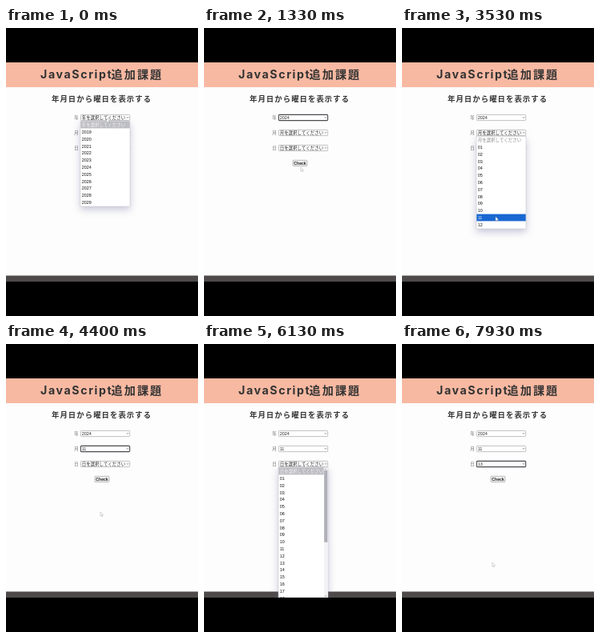
An HTML page with a canvas that plays this animation: 240 by 360 pixels, repeating every 8 s.

```html
<!DOCTYPE html>
<html lang="ja">
<head>
<meta charset="utf-8">
<style>
  html, body { margin: 0; width: 100%; height: 100%; overflow: hidden; background: #000; }
  canvas { display: block; width: 240px; height: 360px; }
</style>
</head>
<body>
<canvas id="stage"></canvas>
<script>
const LOOP = 8000, ROW = 8.79;
const SANS = '"Liberation Sans", "Noto Sans CJK JP", sans-serif';
const HEAD = 'Inter, "Noto Sans CJK JP", sans-serif';
const canvas = document.getElementById('stage');
const ratio = window.devicePixelRatio || 1;
canvas.width = 240 * ratio;
canvas.height = 360 * ratio;
const ctx = canvas.getContext('2d');
ctx.scale(ratio, ratio);

const twoDigits = n => String(n).padStart(2, '0');
const range = (first, count, format) => Array.from({ length: count }, (_, i) => format(first + i));

// top: upper edge of the select; open / pick: times in ms
const selects = [
  { label: '年', top: 108, open: 0, pick: 1150, value: '2024', bottom: 223, items: range(2019, 11, String) },
  { label: '月', top: 127, open: 2540, pick: 3950, value: '11', bottom: 251, items: range(1, 12, twoDigits) },
  { label: '日', top: 146, open: 5800, pick: 7650, value: '13', bottom: 317, items: range(1, 31, twoDigits), scroll: true }
];

// pointer stops: time, x, y
const path = [
  [0, 126, 113], [200, 126, 113], [800, 119, 173], [1150, 120, 174], [1400, 121, 174],
  [2100, 127, 131], [2750, 127, 132], [3500, 117, 236], [3950, 118, 237], [4400, 118, 210],
  [5100, 126, 150], [6250, 126, 150], [7000, 111, 274], [7650, 111, 274], [8000, 113, 273]
];

function pointerAt(t) {
  const i = path.findIndex(stop => stop[0] > t);
  const [t0, x0, y0] = path[i - 1], [t1, x1, y1] = path[i];
  const u = (t - t0) / (t1 - t0), e = u * u * (3 - 2 * u);
  return { x: x0 + (x1 - x0) * e, y: y0 + (y1 - y0) * e };
}

function rect(x, y, w, h, color) {
  ctx.fillStyle = color;
  ctx.fillRect(x, y, w, h);
}

function box(x, y, w, h, fill, stroke, line, radius = 1) {
  ctx.beginPath();
  ctx.roundRect(x, y, w, h, radius);
  ctx.fillStyle = fill;
  ctx.fill();
  ctx.strokeStyle = stroke;
  ctx.lineWidth = line;
  ctx.stroke();
}

function text(string, x, middle, size, color, { family = SANS, weight = 400, spacing = 0, align = 'left' } = {}) {
  ctx.font = `${weight} ${size}px ${family}`;
  ctx.letterSpacing = spacing + 'px';
  ctx.textAlign = align;
  ctx.fillStyle = color;
  ctx.fillText(string, x, middle + size * 0.37);
}

function polyline(points, color, width) {
  ctx.beginPath();
  points.forEach(([x, y]) => ctx.lineTo(x, y));
  ctx.strokeStyle = color;
  ctx.lineWidth = width;
  ctx.stroke();
}

function drawPage() {
  rect(0, 0, 240, 360, '#000');
  rect(0, 43, 240, 274, '#fdfdfd');
  rect(0, 43, 240, 31, '#f8b9a2');
  rect(0, 309.5, 240, 7.5, '#4e4a49');
  text('JavaScript', 43, 58, 14.2, '#333', { family: HEAD, weight: 700, spacing: 1.6 });
  text('追加課題', 131.5, 57.9, 14.2, '#333', { family: HEAD, weight: 700, spacing: 2 });
  text('年月日から曜日を表示する', 57, 88.5, 9.4, '#333', { family: HEAD, weight: 700, spacing: 1.05 });
  box(111, 165.3, 18, 7.2, '#efefef', '#999', 0.6);
  text('Check', 120, 168.7, 5.1, '#222', { weight: 700, align: 'center' });
}

function drawSelect(select, t, focused) {
  const { label, top, value } = select;
  const picked = t >= select.pick, middle = top + 3.8;
  text(label, 85.3, middle, 5.4, '#666');
  box(93.4, top + 0.4, 61.3, 7.2, '#fff', focused ? '#4a4a50' : '#999', focused ? 1.1 : 0.6);
  text(picked ? value : `${label}を選択してください`, 94.7, middle, 5.45, '#222');
  polyline([[150.8, middle - 0.6], [152, middle + 0.6], [153.2, middle - 0.6]], '#444', 0.6);
}

function drawList({ label, top, bottom, items, scroll }, pointer) {
  const start = top + 8.3, first = start + ROW + 0.6;
  const right = scroll ? 150 : 155;
  const hovered = Math.floor((pointer.y - first) / ROW);

  ctx.save();
  ctx.beginPath();
  ctx.rect(0, 43, 240, 274);
  ctx.clip();
  ctx.shadowColor = 'rgba(95, 95, 150, .34)';
  ctx.shadowBlur = 9 * ratio;
  ctx.shadowOffsetY = 4 * ratio;
  rect(93, start, 62, bottom - start, '#fff');
  ctx.shadowColor = 'transparent';
  ctx.strokeStyle = '#c4c4c8';
  ctx.lineWidth = 0.5;
  ctx.strokeRect(93, start, 62, bottom - start);

  if (hovered < 0) rect(93.3, start + 0.3, right - 93.6, ROW, '#bcbcc3');
  ctx.save();
  ctx.beginPath();
  ctx.rect(93, start, right - 93, bottom - start);
  ctx.clip();
  text(`${label}を選択してください`, 94.7, start + 4.3, 5.45, hovered < 0 ? '#f6f6f8' : '#888');
  items.forEach((item, i) => {
    const y = first + i * ROW;
    if (i === hovered) rect(93.3, y, right - 93.6, ROW, '#1967d2');
    text(item, 94.7, y + ROW / 2, 5.4, i === hovered ? '#fff' : '#111');
  });
  ctx.restore();

  if (scroll) {
    rect(150, start, 4.8, bottom - start, '#f3f3f5');
    rect(150.2, start + 3.5, 4.2, 90, '#b0b0ba');
    polyline([[151.2, 156.8], [152.2, 155.8], [153.2, 156.8]], '#777', 0.6);
    polyline([[151.2, 314.7], [152.2, 315.7], [153.2, 314.7]], '#555', 0.7);
  }
  ctx.restore();
}

function drawPointer({ x, y }) {
  ctx.save();
  ctx.translate(x, y);
  ctx.beginPath();
  [[0, 0], [0, 5], [1.2, 4], [2, 5.8], [2.9, 5.4], [2.1, 3.7], [3.6, 3.6]].forEach(([a, b]) => ctx.lineTo(a, b));
  ctx.closePath();
  ctx.fillStyle = '#fff';
  ctx.fill();
  ctx.strokeStyle = '#999';
  ctx.lineWidth = 0.4;
  ctx.stroke();
  ctx.restore();
}

function draw(now) {
  const t = now % LOOP;
  const pointer = pointerAt(t);
  const active = selects.filter(s => t >= s.open).pop();
  const listOpen = t < active.pick;
  drawPage();
  selects.forEach(s => drawSelect(s, t, s === active && !listOpen));
  if (listOpen) drawList(active, pointer);
  drawPointer(pointer);
  requestAnimationFrame(draw);
}
requestAnimationFrame(draw);
</script>
</body>
</html>
```
